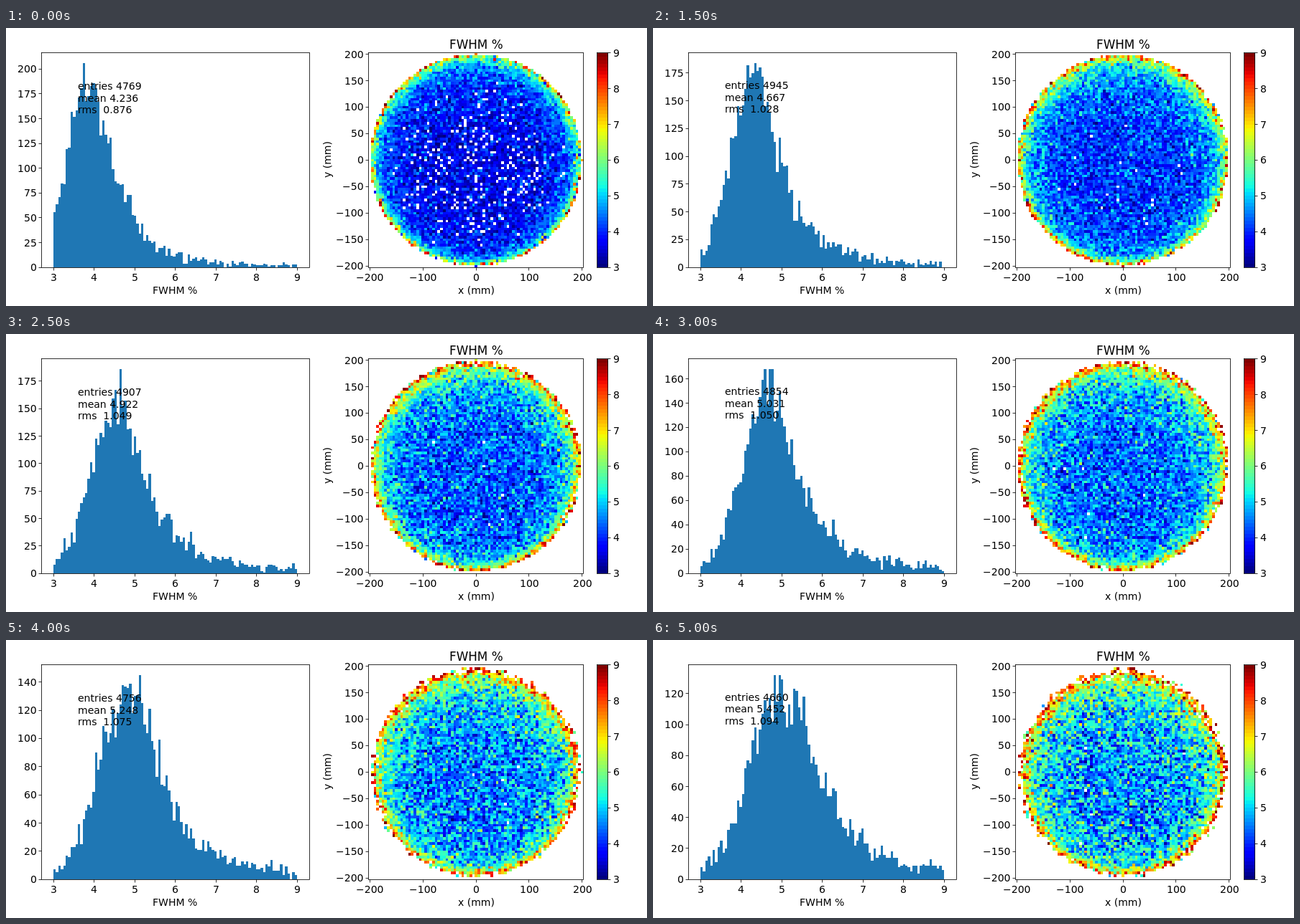
An HTML page with a canvas that plays this animation: 892x388 px, repeating every 5500 ms.

```html
<!DOCTYPE html>
<html>
<head>
<meta charset="utf-8">
<style>
html, body { margin: 0; width: 100%; height: 100%; overflow: hidden; background: #fff; }
canvas { display: block; }
</style>
</head>
<body>
<canvas id="stage" width="892" height="388"></canvas>
<script>
const ctx = document.getElementById('stage').getContext('2d');
const STEP = 500, COUNT = 11, BINS = 100, GRID = 81, LEVELS = 60;
const TOP = 34.7, BOTTOM = 334.2, HEIGHT = BOTTOM - TOP;

// Measured steps: index, entries, mean, rms, tallest bin; the steps between are interpolated
const runs = [
  [0, 4769, 4.236, .876, 206],
  [2, 4958, 4.515, .995, 192],
  [4, 4932, 4.819, 1.062, 176],
  [5, 4907, 4.922, 1.049, 186],
  [7, 4801, 5.14, 1.05, 150],
  [9, 4711, 5.357, 1.1, 139],
  [10, 4660, 5.452, 1.094, 132]
];

function random(seed) {
  return () => {
    seed = seed + 0x6D2B79F5 | 0;
    let t = Math.imul(seed ^ seed >>> 15, 1 | seed);
    t = t + Math.imul(t ^ t >>> 7, 61 | t) ^ t;
    return ((t ^ t >>> 14) >>> 0) / 4294967296;
  };
}
const gauss = rnd => (rnd() + rnd() + rnd() + rnd() - 2) * 1.73;

// Piecewise linear curve through (xs, ys)
function curve(x, xs, ys) {
  let i = 1;
  while (i < xs.length - 1 && x > xs[i]) i++;
  const t = (x - xs[i - 1]) / (xs[i] - xs[i - 1]);
  return ys[i - 1] + (ys[i] - ys[i - 1]) * Math.max(0, Math.min(1, t));
}
const column = i => runs.map(r => r[i]);
const stat = (n, i) => curve(n, column(0), column(i));

const jet = Array.from({ length: LEVELS }, (_, i) => {
  const v = i / (LEVELS - 1);
  const rgb = [
    curve(v, [0, .35, .66, .89, 1], [0, 0, 1, 1, .5]),
    curve(v, [0, .125, .375, .64, .91, 1], [0, 0, 1, 1, 0, 0]),
    curve(v, [0, .11, .34, .65, 1], [.5, 1, 1, 0, 0])
  ];
  return `rgb(${rgb.map(c => Math.round(c * 255))})`;
});

// Disc of detector cells: resolution worsens towards the rim, more gently at the top
const cells = [];
const cellRnd = random(11);
for (let j = -40; j <= 40; j++) {
  for (let i = -40; i <= 40; i++) {
    const r = Math.hypot(i, j);
    if (r > 40) continue;
    const up = r ? -j / r : 0;
    const rim = (3.4 - .5 * up) * Math.exp((r - 40) / (2.7 + .8 * up));
    const base = .8 * (r / 40) ** 3 - .005 * j + rim + .35 * gauss(cellRnd);
    cells.push({ i: i + 40, j: j + 40, r, base });
  }
}

// Gaussian rise up to the mode, then a long power-law tail
function density(x, n, mode) {
  const d = x - mode;
  if (d < 0) return Math.exp(-.5 * (d / (.54 + .003 * n * n)) ** 2);
  return (1 + (d / (.86 + .01 * n)) ** 2) ** (.03 * n - 1.3);
}

function makeBars(n, entries, mode, peak, rnd) {
  const shape = Array.from({ length: BINS }, (_, b) => density(3.03 + b * .06, n, mode));
  const scale = entries / shape.reduce((a, b) => a + b);
  const bars = shape.map(s => {
    const h = s * scale;
    return Math.max(0, Math.min(peak, Math.round(h + Math.sqrt(h) * gauss(rnd))));
  });
  bars[bars.indexOf(Math.max(...bars))] = peak;
  return bars;
}

// Rank cells by score, then hand out values so that they follow the histogram
function makeMap(n, entries, bars, rnd) {
  const ranked = cells.map(c => {
    const stray = c.r > 38.8 && rnd() < .15;
    return { c, score: stray ? 4 * rnd() : c.base + .45 * gauss(rnd) };
  }).sort((a, b) => a.score - b.score);
  const total = bars.reduce((a, b) => a + b);
  const first = Math.round(5 + 233 * Math.exp(-n));
  let bin = 0, sum = 0;
  return ranked.slice(first, first + entries).map(({ c }, k) => {
    const goal = (k + .5) / entries * total;
    while (sum + bars[bin] <= goal) sum += bars[bin++];
    const v = (bin + (goal - sum) / bars[bin]) / BINS;
    return { i: c.i, j: c.j, color: jet[Math.floor(v * LEVELS)] };
  });
}

function makeFrame(n) {
  const rnd = random(100 + n);
  const entries = Math.round(stat(n, 1)), mean = stat(n, 2);
  const peak = Math.round(stat(n, 4));
  const bars = makeBars(n, entries, mean - .38, peak, rnd);
  const map = makeMap(n, entries, bars, rnd);
  const lines = [
    `entries ${entries}`, `mean ${mean.toFixed(3)}`, `rms  ${stat(n, 3).toFixed(3)}`
  ];
  return { bars, map, lines, peak };
}
const frames = Array.from({ length: COUNT }, (_, n) => makeFrame(n));

// Text starts on whole pixels; anchor is 0 for left, .5 for centre, 1 for right
function text(s, x, y, anchor = .5, size = 14) {
  s = String(s).replace('-', '\u2212');
  ctx.font = `${size}px "DejaVu Sans", sans-serif`;
  ctx.fillStyle = '#000';
  ctx.fillText(s, Math.round(x - anchor * ctx.measureText(s).width), Math.round(y));
}
function line(x, y, dx, dy) {
  ctx.beginPath();
  ctx.moveTo(x, y);
  ctx.lineTo(x + dx, y + dy);
  ctx.stroke();
}
const snap = v => Math.floor(v) + .5;

function box(x, width) {
  ctx.strokeRect(x, snap(TOP), width, snap(BOTTOM) - snap(TOP));
}
function xTick(x, label) {
  line(snap(x), snap(BOTTOM), 0, 4);
  text(label, x, 353);
}
function yTick(axis, y, label) {
  line(axis, snap(y), -4, 0);
  text(label, axis - 7, y + 5, 1);
}
function block(x0, y0, x1, y1, color) {
  [x0, y0, x1, y1] = [x0, y0, x1, y1].map(Math.round);
  ctx.fillStyle = color;
  ctx.fillRect(x0, y0, x1 - x0, y1 - y0);
}

function drawHistogram({ bars, lines, peak }) {
  const yMax = peak * 1.05;
  const X = v => 66 + 56.53 * (v - 3);
  const Y = v => BOTTOM - v * HEIGHT / yMax;
  bars.forEach((h, b) => block(X(3 + b * .06), Y(h), X(3.06 + b * .06), BOTTOM, '#1f77b4'));
  box(49.5, 373);
  for (let v = 3; v <= 9; v++) xTick(X(v), v);
  const step = yMax > 180 ? 25 : 20;
  for (let v = 0; v <= yMax; v += step) yTick(49.5, Y(v), v);
  text('FWHM %', 235.5, 371);
  const last = Y(Math.floor(.75 * peak) + 1);
  lines.forEach((s, i) => text(s, 100, Math.floor(last - 16.4 * (2 - i)), 0));
}

function drawMap({ map }) {
  const cell = HEIGHT / GRID, mm = cell / 5, midY = (TOP + BOTTOM) / 2;
  const X = i => 504.3 + i * cell, Y = j => TOP + j * cell;
  for (const { i, j, color } of map) block(X(i), Y(j), X(i + 1), Y(j + 1), color);
  box(504.5, 299);
  for (let v = -200; v <= 200; v += 100) xTick(654 + v * mm, v);
  for (let v = -200; v <= 200; v += 50) yTick(504.5, midY - v * mm, v);
  text('FWHM %', 654, 29, .5, 16.8);
  text('x (mm)', 654, 371);
  ctx.save();
  ctx.translate(452, Math.round(midY));
  ctx.rotate(-Math.PI / 2);
  text('y (mm)', 0, 0);
  ctx.restore();
}

function drawColorbar() {
  const Y = t => BOTTOM - t * HEIGHT;
  jet.forEach((c, i) => block(823, Y((i + 1) / LEVELS), 838, Y(i / LEVELS), c));
  box(822.5, 15);
  for (let v = 3; v <= 9; v++) {
    const y = Y((v - 3) / 6);
    line(837.5, snap(y), 4, 0);
    text(v, 845, y + 5, 0);
  }
}

let shown = -1;
function tick() {
  const n = Math.floor(performance.now() / STEP) % COUNT;
  if (n !== shown) {
    shown = n;
    ctx.fillStyle = '#fff';
    ctx.fillRect(0, 0, 892, 388);
    ctx.strokeStyle = '#000';
    ctx.lineWidth = .8;
    drawHistogram(frames[n]);
    drawMap(frames[n]);
    drawColorbar();
  }
  requestAnimationFrame(tick);
}
tick();
</script>
</body>
</html>
```
